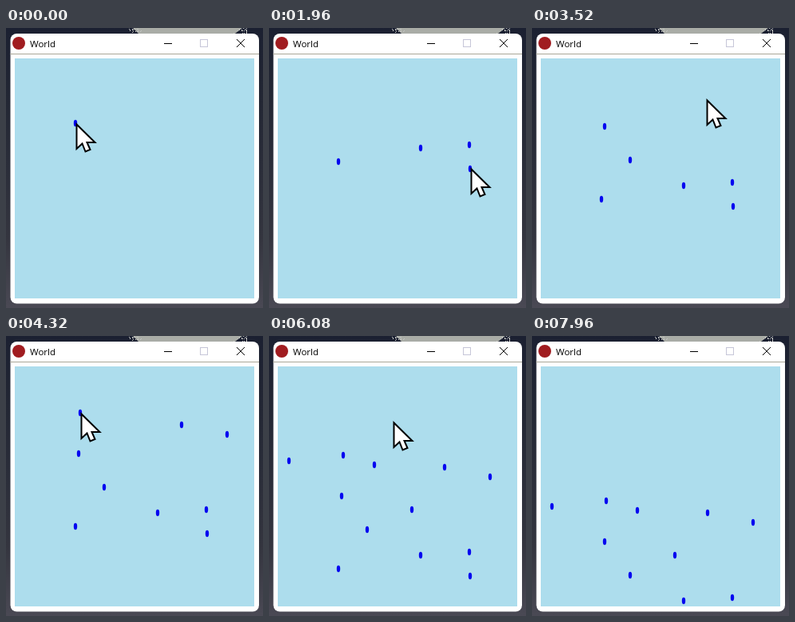
An HTML page with a canvas for the animation above (8 s loop, 322x350 px).

```html
<!DOCTYPE html>
<html lang="en">
<head>
<meta charset="utf-8">
<title>World</title>
<style>
  html, body { margin: 0; width: 100%; height: 100%; overflow: hidden; background: #20242f; }
  canvas { display: block; }
</style>
</head>
<body>
<canvas id="stage" width="322" height="350"></canvas>
<script>
const ctx = document.getElementById('stage').getContext('2d');
const LOOP = 8000;

// All drops fall together at one speed after a short pause
const fallen = time => Math.round(Math.max(0, time - 380) * 0.0302);

// Four slow clicks, then a quicker series
const clickTime = i => i < 4 ? i * 650 : 2780 + (i - 4) * 385;

// Each drop: x and its height before the common fall
const drops = [
  [87, 119], [190, 102], [251, 98], [252, 128], [91, 28], [123, 70],
  [220, -8], [277, 4], [93, -23], [25, -16], [132, -11], [179, 45]
].map(([x, y], i) => ({ x, y, born: clickTime(i) }));

// The pointer visits every click, wanders up and leaves on the right
const stops = [
  ...drops.map(({ x, y, born }) => ({ time: born, x: x + 1, y: y + fallen(born) })),
  { time: 6080, x: 156, y: 107 },
  { time: 6700, x: 175, y: 115 },
  { time: 7300, x: 330, y: 170 }
];

const smooth = p => p * p * (3 - 2 * p);

function pointerAt(time) {
  const next = stops.findIndex(stop => stop.time > time);
  if (next < 0) return stops[stops.length - 1];
  const a = stops[next - 1], b = stops[next];
  const p = smooth((time - a.time) / (b.time - a.time));
  return { x: a.x + (b.x - a.x) * p, y: a.y + (b.y - a.y) * p };
}

function rect(x, y, w, h, color) {
  ctx.fillStyle = color;
  ctx.fillRect(x, y, w, h);
}

function polygon(points, color) {
  ctx.fillStyle = color;
  ctx.beginPath();
  points.forEach(([x, y]) => ctx.lineTo(x, y));
  ctx.closePath();
  ctx.fill();
}

function line(x1, y1, x2, y2) {
  ctx.beginPath();
  ctx.moveTo(x1, y1);
  ctx.lineTo(x2, y2);
  ctx.stroke();
}

function ellipse(x, y, rx, ry, color) {
  ctx.fillStyle = color;
  ctx.beginPath();
  ctx.ellipse(x, y, rx, ry, 0, 0, 2 * Math.PI);
  ctx.fill();
}

function drawDesktop() {
  const shade = ctx.createLinearGradient(0, 0, 0, 350);
  ['#1b2031', '#232734', '#2b2e3a', '#34353f', '#4a4954']
    .forEach((color, i) => shade.addColorStop(i / 4, color));
  rect(0, 0, 322, 350, shade);
  polygon([[159, 0], [166, 7], [287, 7], [296, 0]], '#a9aca6');

  // Light specks along the ragged ends of the bright patch
  let seed = 7;
  const random = () => (seed = seed * 16807 % 2147483647) / 2147483647;
  for (let i = 0; i < 40; i++) {
    const start = i % 2 ? 153 : 285;
    rect(start + Math.floor(random() * 18), Math.floor(random() * 7), 1, 1, '#c3c5c2');
  }
}

function drawWindow() {
  ctx.fillStyle = '#fff';
  ctx.beginPath();
  ctx.roundRect(5.5, 7, 311.5, 337.5, 8);
  ctx.fill();
  rect(5, 32, 312, 1, '#aaa798');
  ellipse(16, 19, 8, 8, '#a01c20');

  ctx.fillStyle = '#000';
  ctx.font = '11.5px "Open Sans", "Noto Sans", sans-serif';
  ctx.fillText('World', 30, 24);

  ctx.lineWidth = 1;
  ctx.strokeStyle = '#c6c6d8';
  ctx.strokeRect(243.5, 14.5, 9, 9);
  ctx.strokeStyle = '#000';
  line(198, 19.5, 208, 19.5);
  line(289, 14, 299, 24);
  line(299, 14, 289, 24);
}

function drawScene(time) {
  ctx.save();
  ctx.beginPath();
  ctx.rect(11, 38, 300, 300);
  ctx.clip();
  rect(11, 38, 300, 300, '#addded');
  for (const { x, y, born } of drops)
    if (time >= born) ellipse(x, y + fallen(time), 2.2, 4.2, '#0505f0');
  ctx.restore();
}

function drawPointer(time) {
  const { x, y } = pointerAt(time);
  ctx.save();
  ctx.translate(Math.round(x), Math.round(y));
  polygon([[0.5, 1.5], [0.5, 32], [7.5, 25.5], [11.5, 35.5], [17.5, 33], [13.5, 24], [23.5, 24]], '#fff');
  ctx.strokeStyle = '#000';
  ctx.lineWidth = 2;
  ctx.stroke();
  ctx.restore();
}

function frame() {
  const time = performance.now() % LOOP;
  drawDesktop();
  drawWindow();
  drawScene(time);
  drawPointer(time);
  requestAnimationFrame(frame);
}
frame();
</script>
</body>
</html>
```
